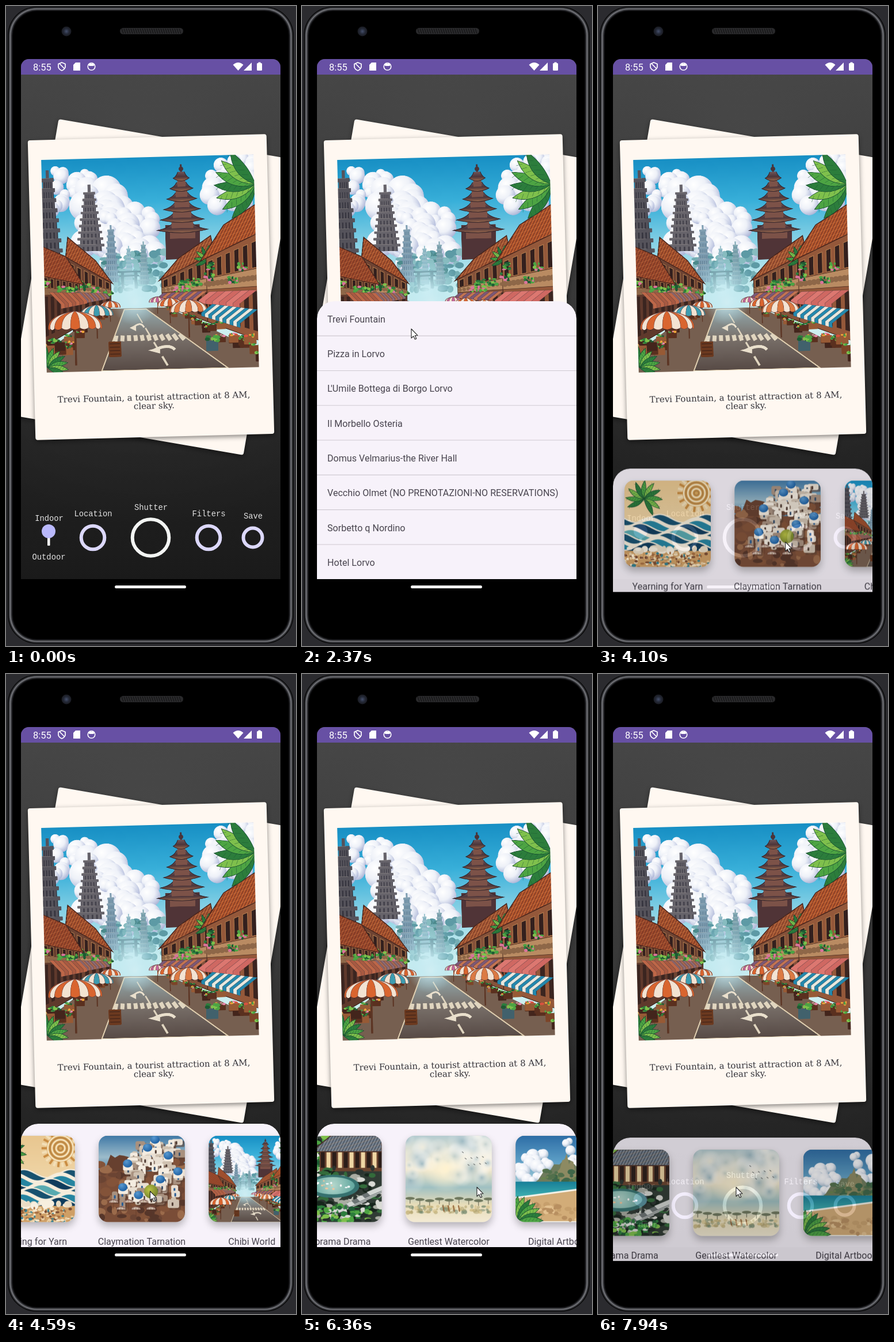
Animation of 504 by 1110 pixels, one loop 8000 ms. Source, as an HTML page with a canvas:

```html
<!DOCTYPE html>
<html lang="en">
<head>
<meta charset="utf-8">
<title>Travel postcard app</title>
<style>
html, body { margin: 0; width: 100%; height: 100%; overflow: hidden; background: #2a2a2e; }
canvas { display: block; }
</style>
</head>
<body>
<canvas id="stage" width="504" height="1110"></canvas>
<script>
const LOOP = 8000, LEFT = 26, WIDTH = 451, FLOOR = 994;
const SANS = 'Roboto, sans-serif';
const LEAVES = ['#1d5a33', '#2c7d3c', '#4da443', '#7fc04c'];
const FRUIT = ['#d9523f', '#eda63c', '#e786a8', '#4f9a45'];
const CRATES = ['#5a301f', '#7c4528', '#975a35', '#43251c'];
let g, seed = 1;

// ---------- helpers ----------
const rnd = () => (seed = seed * 16807 % 2147483647) / 2147483647;
const pick = list => list[Math.floor(rnd() * list.length)];
const times = (n, draw) => { for (let i = 0; i < n; i++) draw(i, i / n); };
const mix = (a, b, f) => a + (b - a) * f;
const clamp = v => Math.min(1, Math.max(0, v));
const ease = v => (v = clamp(v)) * v * (3 - 2 * v);

function layer(w, h, scale, paint) {
  const c = document.createElement('canvas');
  c.width = w * scale; c.height = h * scale;
  g = c.getContext('2d');
  g.scale(scale, scale);
  paint();
  return c;
}
function stops(grad, colors) {
  colors.forEach((c, i) => grad.addColorStop(i / (colors.length - 1), c));
  return grad;
}
const down = (y1, y2, ...colors) => stops(g.createLinearGradient(0, y1, 0, y2), colors);
const glow = (x, y, r, ...colors) => stops(g.createRadialGradient(x, y, 0, x, y, r), colors);

function box(color, x, y, w, h, r = 0) {
  g.fillStyle = color;
  g.beginPath(); g.roundRect(x, y, w, h, r); g.fill();
}
function disc(color, x, y, rx, ry = rx) {
  g.fillStyle = color;
  g.beginPath(); g.ellipse(x, y, rx, ry, 0, 0, 7); g.fill();
}
function ring(color, x, y, r, width) {
  g.strokeStyle = color; g.lineWidth = width;
  g.beginPath(); g.arc(x, y, r, 0, 7); g.stroke();
}
function poly(color, pts, ink, width = 1) {
  g.beginPath();
  for (let i = 0; i < pts.length; i += 2) g.lineTo(pts[i], pts[i + 1]);
  g.closePath();
  g.fillStyle = color; g.fill();
  if (ink) { g.strokeStyle = ink; g.lineWidth = width; g.stroke(); }
}
function line(color, width, x1, y1, x2, y2) {
  g.strokeStyle = color; g.lineWidth = width;
  g.beginPath(); g.moveTo(x1, y1); g.lineTo(x2, y2); g.stroke();
}
function text(str, x, y, font, color, align = 'left') {
  g.font = font; g.fillStyle = color; g.textAlign = align;
  g.fillText(str, x, y);
}
function scatter(n, x, y, w, h, size, colors) {
  times(n, () => disc(pick(colors), x + rnd() * w, y + rnd() * h, size * (.4 + rnd()), size * (.4 + rnd() * .6)));
}

// ---------- picture parts ----------
function cloud(x, y, w, h, n, shade = '#a9b3d6') {
  times(n, (i, f) => {
    const r = h * (.12 + rnd() * .12), px = x + rnd() * w, py = y + h * f;
    disc(glow(px - r * .3, py - r * .4, r * 1.5, '#fff', '#eef1f8', shade), px, py, r);
  });
}
function temple(x, top, bottom, w, stone, dark) {
  const n = 9, step = (bottom - top) / n;
  line(stone, w / 10, x, top - w / 4, x, top);
  times(n, (i, f) => {
    const half = w * mix(.2, .5, f), y = top + i * step;
    box(dark, x - half * .8, y, half * 1.6, step + 1);
    times(5, k => box(stone, x + half * (k * .32 - .76), y + 3, half * .2, step - 2));
    box(stone, x - half, y, half * 2, step * .4, 1);
    box('#e0d0c038', x - half, y, half * 1.4, 1);
  });
}
function pagoda(x, top) {
  line('#4a3338', 3, x, top, x, top + 24);
  disc('#4a3338', x, top + 8, 4);
  box('#503437', x - 30, top + 105, 60, 60);
  for (let i = 5; i >= 0; i--) {
    const half = 14 + i * 6, y = top + 24 + i * 18;
    box('#7c5248', x - half * .5, y, half, 15);
    g.beginPath(); g.moveTo(x - half * .4, y - 11);
    g.quadraticCurveTo(x - half * .6, y - 3, x - half, y);
    g.quadraticCurveTo(x, y + 10, x + half, y);
    g.quadraticCurveTo(x + half * .6, y - 3, x + half * .4, y - 11);
    g.fillStyle = down(y - 11, y + 6, '#6f5558', '#4c353a', '#a5704f'); g.fill();
    g.strokeStyle = '#33242a'; g.lineWidth = 1; g.stroke();
  }
}
function tiled(pts, color, shade) {
  poly(color, pts, '#45241c', 1.5);
  g.save(); g.clip();
  times(110, i => line(shade, 1, i * 5, 0, i * 5 - 190, 370));
  times(60, i => line('#ffb36a38', 1, 0, i * 7, 370, i * 7 - 120));
  g.restore();
}
function umbrella(x, y, r, color) {
  const n = 9, h = r * .62, edge = i => x - r * Math.cos(Math.PI * i / n);
  line('#5c3524', r / 14, x, y - h, x, y + r * 1.4);
  times(n, i => {
    const a = edge(i), b = edge(i + 1);
    g.beginPath(); g.moveTo(x, y - h);
    g.quadraticCurveTo(a, y - h * .8, a, y);
    g.quadraticCurveTo((a + b) / 2, y + h * .2, b, y);
    g.quadraticCurveTo(b, y - h * .8, x, y - h);
    g.fillStyle = i % 2 ? '#f3e3d2' : color; g.fill();
    g.strokeStyle = '#5b303080'; g.lineWidth = .7; g.stroke();
  });
}
function palm(x, y, len, from, to, n) {
  times(n, (i, f) => {
    g.save(); g.translate(x, y); g.rotate(mix(from, to, f));
    g.beginPath(); g.moveTo(0, 0);
    g.quadraticCurveTo(len * .5, -len * .34, len, 0);
    g.quadraticCurveTo(len * .5, len * .16, 0, 0);
    g.fillStyle = LEAVES[1 + i % 3]; g.fill();
    g.strokeStyle = '#174d30'; g.lineWidth = .8; g.stroke();
    times(7, (k, d) => line('#1d5a3390', .8, len * d, 0, len * (d + .1), -len * .12));
    g.restore();
  });
}
function ridge(color, x1, x2, base, height) {
  const pts = [x1, base];
  times(13, (i, f) => pts.push(mix(x1, x2, f), base - height * Math.sin(Math.PI * f) * (.5 + rnd() * .5)));
  poly(color, [...pts, x2, base]);
}

// ---------- street in one-point perspective ----------
const EYE = { x: 152, y: 238 }, WEST = -152, EAST = 218;
const place = (side, depth, height) => [EYE.x + side * depth, EYE.y - height * depth];
function slab(color, side, far, near, top, bottom, ink) {
  poly(color, [...place(side, far, top), ...place(side, near, top), ...place(side, near, bottom), ...place(side, far, bottom)], ink);
}
function awning(side, far, near, height, n, color, alt) {
  times(n, (i, f) => {
    const a = mix(far, near, f), b = mix(far, near, f + 1 / n), reach = side * .86;
    poly(i % 2 ? alt : color, [...place(side, a, height), ...place(side, b, height),
      ...place(reach, b, height - 23), ...place(reach, b, height - 31),
      ...place(reach, a, height - 31), ...place(reach, a, height - 23)], '#30303a50', .7);
  });
}
function house(side, far, near, tall, wall, roof, n = 6) {
  slab(wall, side, far, near, tall, -85, '#38211c');
  times(n, (i, f) => {
    const a = mix(far, near, f + .2 / n), b = mix(far, near, f + .75 / n);
    slab('#33201e', side, a, b, tall * .84, tall * .4, '#b17a4c');
    slab('#3b2520', side, a, b, 0, -70);
  });
  slab('#b98b62', side, far, near, tall * .38, tall * .08, '#5f3d2c');
  times(n * 2, (i, f) => disc('#8e6748', ...place(side, mix(far, near, f + .25 / n), tall * .23), near * 5));
  const peak = mix(far, near, .35);
  tiled([...place(side, far * .92, tall - 5), ...place(side, peak, tall + 52), ...place(side, near, tall + 46),
    ...place(side, near * 1.04, tall - 5)], roof, '#6f2f20');
  times(4, () => {
    const [x, y] = place(side, mix(far, near, rnd()), tall * (.3 + rnd() * .5));
    scatter(14, x - 8, y, 16, 12, 3, [...LEAVES, '#d9749b']);
  });
}

function village() {
  seed = 77;
  box(down(0, 230, '#178fc4', '#38afd9', '#8ed4e6', '#cdeff0'), 0, 0, 370, 370);
  cloud(15, 20, 70, 70, 22);
  cloud(70, 50, 70, 110, 34);
  cloud(105, 95, 95, 90, 34);
  cloud(290, 5, 80, 85, 28);
  scatter(90, 95, 165, 120, 65, 7, ['#5d9aa5', '#74aeb4', '#4c8a8c', '#87bcc0']);
  temple(118, 124, 215, 30, '#7f9eb2', '#617f94');
  temple(148, 158, 220, 18, '#95bfcb', '#7aa5b5');
  temple(174, 152, 220, 22, '#83a9b5', '#668b99');
  times(2, i => {
    box('#56808b', 128 + i * 3, 197 + i * 7, 40 - i * 6, 3);
    box('#56808b', 134 + i * 23, 198, 5, 30);
  });
  disc(glow(150, 232, 60, '#cfeff4f0', '#a8dfeb00'), 150, 232, 60);
  temple(10, 32, 190, 54, '#55535b', '#34333d');
  temple(82, 58, 160, 52, '#67646b', '#42404a');
  pagoda(243, 14);
  house(WEST, .24, .72, 96, '#6e4433', '#a9552f');
  house(WEST, .6, 1.02, 40, '#5f392c', '#9c4a2c');
  house(EAST, .24, .64, 108, '#85523a', '#a85c37');
  palm(286, 180, 24, -3.6, 1.2, 9);
  house(EAST, .6, 1.02, 104, '#94583a', '#b4582e');
  palm(372, 52, 72, 2.2, 4.4, 7);
  awning(WEST, .3, .62, 10, 9, '#8d6a74', '#a76750');
  awning(WEST, .6, .95, 8, 7, '#bd6748', '#a85a42');
  awning(EAST, .25, .6, 4, 10, '#7c5877', '#c47452');
  awning(EAST, .62, 1, 2, 6, '#dc7770', '#cf6862');

  const road = [138, 264, 176, 264, 316, 370, 96, 370];
  poly('#765f50', [100, 262, 215, 262, 420, 370, -50, 370]);
  poly(down(262, 370, '#93aaae', '#786f69', '#574a45'), road, '#e0cfb0', 2);
  g.save(); g.clip();
  times(12, i => line('#e0d5bf', 7, 112 + i * 11, 309, 109 + i * 12, 319));
  times(4, i => line('#e0d5bf', 2 + i * .6, 160 + i * 14, 272 + i * 25, 169 + i * 14, 288 + i * 25));
  times(2, i => {
    const x = 152 + i * 36, y = 296 + i * 40, w = 14 + i * 12;
    g.beginPath(); g.moveTo(x, y);
    g.quadraticCurveTo(x + w, y - 12, x + w * 1.4, y);
    g.strokeStyle = '#e9dfcc'; g.lineWidth = 3 + i * 2; g.stroke();
    poly('#e9dfcc', [x - w * .4, y, x + w * .4, y - 5, x + w * .4, y + 6]);
  });
  g.restore();
  disc(glow(156, 252, 40, '#d3eff4c0', '#b5e3ee00'), 156, 252, 40);

  times(44, (i, f) => {
    const depth = .25 + f * .75, side = i % 2 ? EAST : WEST, size = 20 * depth;
    const [x, y] = place(side * (.9 + rnd() * .2), depth, -80 - rnd() * 30);
    box(pick(CRATES), x - size / 2, y, size * 1.2, size * .8, 1);
    scatter(6, x - size / 2, y - size * .2, size, size * .25, size * .16, i % 3 ? LEAVES : FRUIT);
  });
  const shades = ['#db7a43', '#3d9cb0', '#c5669b', '#d9652f'];
  for (let k = 2; k >= 0; k--) {
    const west = .66 * .62 ** k, east = .45 * .67 ** k;
    umbrella(...place(WEST, west, -84), west * 71, shades[(3 + k * 2) % 4]);
    umbrella(...place(EAST, east, -70), east * 73, shades[(4 - k) % 4]);
  }
  awning(EAST, .64, 1, -32, 11, '#2388ad', '#e9e8de');
  palm(2, 362, 36, -1.6, .8, 7);
  box('#41616c', 279, 322, 21, 18, 2);
  scatter(16, 278, 314, 22, 8, 4, LEAVES);
  box('#6b391f', 109, 319, 22, 27, 2);
  times(4, i => line('#42241a', 1.2, 111, 323 + i * 6, 129, 323 + i * 6));
}

// ---------- style thumbnails, 150 x 150 ----------
function yarn() {
  seed = 5;
  box(down(0, 80, '#e8c68f', '#f0d6a8'), 0, 0, 150, 150);
  times(26, (i, f) => {
    const a = f * Math.PI * 2;
    line(i % 2 ? '#c98c42' : '#f3dfb8', 4, 125, 22, 125 + 33 * Math.cos(a), 22 + 33 * Math.sin(a));
  });
  disc('#d9a75a', 125, 22, 24);
  times(6, i => ring(i % 2 ? '#f6e6c6' : '#b98546', 125, 22, 4 + i * 3.6, 2.4));
  palm(34, 32, 32, -3.6, 1.6, 10);
  times(7, k => {
    for (let x = 0; x <= 150; x += 2) {
      const y = 66 + k * 8 + Math.sin(x / 13 + k * 1.3) * 7;
      box(['#17516f', '#2584a0', '#0f3c5c', '#58aab0'][k % 4], x, y, 3, 150 - y);
      disc('#f6eddb', x, y, 2, k % 2 ? 3.5 : 1);
    }
  });
  box('#cf9f65', 0, 122, 150, 28);
  scatter(20, 0, 116, 150, 8, 7, ['#f7efdf', '#e9dcc5']);
  scatter(150, 0, 126, 150, 24, 3, ['#e9cda0', '#a86f42', '#f7e6c8', '#327f91', '#7b4c33']);
}
function clay() {
  seed = 11;
  box(down(0, 75, '#3f78a5', '#9cbccb', '#245f8c'), 0, 0, 150, 150);
  ridge('#67402f', -10, 90, 70, 48);
  box('#7a4d37', 0, 62, 150, 88);
  scatter(120, 0, 40, 150, 110, 8, ['#835339', '#56362a', '#9b6b4b', '#6b4433']);
  times(85, (i, f) => {
    const y = mix(6, 112, f), x = mix(62 - f * 50, 136, rnd()), w = 9 + rnd() * 12, h = 9 + rnd() * 11;
    box('#5d4032a0', x + 3, y + 3, w, h, 2);
    box(pick(['#e9dfd2', '#cfc1b0', '#f4ece0', '#a8917f']), x, y, w, h, 3);
    box(pick(['#285c94', '#4f3b32', '#39506b']), x + w * .35, y + h * .35, 3, 6, 1);
    if (i % 11 === 5) {
      box('#f4ece0', x - 2, y - 3, 17, 10, 2);
      disc(glow(x + 4, y - 8, 10, '#5a9ad0', '#1f62a5'), x + 6, y - 5, 8, 7);
    }
  });
  disc(glow(88, 94, 15, '#bcc444', '#77842d'), 91, 97, 12);
  times(6, i => umbrella(26 + i * 13, 116 + i % 2 * 12, 8, '#cdbda3'));
}
function diorama() {
  seed = 23;
  box('#303b34', 0, 0, 150, 150);
  scatter(90, 0, 0, 60, 70, 7, [...LEAVES, '#16281d', '#dfe4dc']);
  box('#6b442f', 42, 26, 108, 36);
  times(11, i => box(i % 2 ? '#efd6a4' : '#2b1d19', 44 + i * 10, 29, 7, 27));
  tiled([28, 28, 62, 0, 150, 0, 150, 28], '#76818e', '#353d48');
  times(9, i => line('#c5ccd2', 3, 0, i * 5, 45 - i * 4, 0));
  scatter(150, 0, 56, 150, 90, 7, ['#a9aca2', '#2b3430', '#d9dad4', '#336b3b', '#17251c']);
  disc('#36716f', 65, 88, 46, 20);
  disc(glow(65, 86, 40, '#b5d8cd', '#5ba39b'), 65, 87, 38, 15);
  scatter(14, 35, 78, 60, 18, 2, ['#f0c69f', '#fff']);
  times(7, i => poly(i % 2 ? '#6c7474' : '#d3d6d3', [70 + i * 9, 128 - i * 5, 118 + i * 9, 108 - i * 5, 124 + i * 9, 114 - i * 5, 76 + i * 9, 134 - i * 5]));
  disc(glow(25, 58, 16, '#ffffffe0', '#ffffff00'), 25, 58, 16);
  scatter(90, 0, 122, 130, 28, 5, [...LEAVES, '#d9dbd4', '#222e27']);
}
function watercolor() {
  seed = 31;
  box(down(0, 150, '#b3cbd0', '#e6e4d2', '#f2e8cd', '#9fc0c2', '#e8ddb9', '#f3ead4'), 0, 0, 150, 150);
  times(40, () => {
    const x = rnd() * 150, y = rnd() * 80, r = 8 + rnd() * 20;
    disc(glow(x, y, r, pick(['#86a9b8b0', '#f8f1dfd0', '#b9c9cac0']), '#ffffff00'), x, y, r);
  });
  disc(glow(70, 58, 40, '#fff2cf', '#fff4d600'), 70, 58, 40);
  times(9, i => {
    const x = 8 + i * 17, y = 109 + i * 7 % 5;
    line('#5d5b48', 1, x, y, x, y + 9);
    disc('#6f785e', x, y, 8, 2.5);
    line('#4c5152', .8, 98 + i * 5, 28 + i * 11 % 23, 101 + i * 5, 30 + i * 11 % 23);
  });
  scatter(70, 0, 122, 150, 12, 4, ['#a99a6180', '#cdb77a80', '#6d846980']);
  times(4, i => line('#96663b', 2, 65 + i * 9, 121, 67 + i * 9, 132));
}
function artbook() {
  seed = 43;
  box(down(0, 85, '#2d6da6', '#5a9cc4', '#a5ced8'), 0, 0, 150, 150);
  cloud(5, 30, 60, 50, 22, '#9db5ca');
  cloud(85, 10, 65, 50, 16, '#9db5ca');
  ridge('#6e7b5c', 30, 150, 84, 52);
  ridge('#8d8a62', 62, 112, 84, 62);
  scatter(50, 45, 60, 90, 24, 5, ['#3f6648', '#69824f', '#52704c']);
  box(down(80, 112, '#187f98', '#46bab6'), 0, 80, 150, 35);
  poly('#d2ac78', [0, 108, 150, 88, 150, 150, 0, 150], '#f7f4ea', 3);
  scatter(60, 0, 118, 150, 32, 5, ['#b88f60', '#e3c190', '#c69f6c']);
  palm(3, 150, 45, -1.8, .2, 8);
}

// ---------- phone and home screen ----------
function card(angle) {
  g.translate(252, 487.5); g.rotate(angle * Math.PI / 180);
  g.shadowColor = '#0007'; g.shadowBlur = 8; g.shadowOffsetY = 3;
  box('#fff8f1', -207.5, -260, 415, 520, 4);
  g.shadowColor = 'transparent';
}
function phone() {
  box('#2b2b2f', 0, 0, 504, 1110);
  ['#0b0b0c', '#3b3c40', '#75767b', '#3a3b3f', '#0e0e10', '#000'].forEach((shade, i) =>
    box(shade, 3 + i * 1.8, 1 + i * 1.6, 497 - i * 3.6, 1105 - i * 3.2, 50 - i * 1.6));
  disc(glow(105, 44, 9, '#46506c', '#252a38', '#17181d'), 105, 44, 8.5);
  box('#29292b', 198, 38, 110, 11, 5.5);
  times(26, i => line('#101011', 1, 201 + i * 4, 39, 204 + i * 4, 48));
  box('#f3f3f3', 189, 1005, 124, 5, 2.5);

  g.beginPath(); g.roundRect(LEFT, 92, WIDTH, FLOOR - 92, [14, 14, 0, 0]); g.clip();
  box(down(119, FLOOR, '#464646', '#363636', '#232323'), LEFT, 92, WIDTH, 902);
  box(glow(252, 300, 600, '#ffffff0c', '#00000000', '#00000040'), LEFT, 92, WIDTH, 902);
  statusBar();
  g.save(); card(9.75); g.restore();
  g.save();
  card(-1.5);
  g.drawImage(villageArt, -185, -225.5, 369, 369);
  ['Trevi Fountain, a tourist attraction at 8 AM,', 'clear sky.'].forEach((s, i) =>
    text(s, 0, 196 + i * 15, '15px "DejaVu Serif", serif', '#33333a', 'center'));
  g.restore();
  controls();
}
function statusBar() {
  box('#6750a4', LEFT, 92, WIDTH, 27);
  text('8:55', 47, 111.5, '16.5px ' + SANS, '#fff');
  g.strokeStyle = g.fillStyle = '#fff'; g.lineWidth = 1.7;
  g.stroke(new Path2D('M97 98l6 2.5V106q-1 4-6 6q-5-2-6-6v-5.500zM93 100l9 9'));
  g.fill(new Path2D('M121 98h8v14h-12v-10z'));
  g.fill(new Path2D('M403.500 112l-9-10q9-8 18 0zM427 98v14h-14z'));
  ring('#fff', 148.5, 105, 6.3, 1.6);
  box('#fff', 143.5, 100, 10, 4, 2);
  box('#fff', 436, 99, 9, 13, 1.5);
  box('#fff', 438.5, 97.5, 4, 3);
}
function controls() {
  const label = (s, x, y) => text(s, x, y, '13.8px "Liberation Mono", monospace', '#e2e2e2', 'center');
  const button = (s, x, r, color = '#dcd8fc') => {
    ring(color, x, 922, r, 6);
    label(s, x + .5, 905.5 - r);
  };
  label('Indoor', 75, 893);
  label('Outdoor', 74.5, 960);
  box('#fff', 72, 912, 4.5, 24, 1);
  disc('#b9b8fb', 74, 911, 12);
  button('Location', 151, 20.3);
  button('Shutter', 251.5, 31.8, '#f3f5f3');
  button('Filters', 352, 20.3);
  button('Save', 429, 16.5);
}

// ---------- bottom sheets ----------
const PLACES = ['Trevi Fountain', 'Pizza in Lorvo', "L'Umile Bottega di Borgo Lorvo", 'Il Morbello Osteria',
  'Domus Velmarius-the River Hall', 'Vecchio Olmet (NO PRENOTAZIONI-NO RESERVATIONS)', 'Sorbetto q Nordino', 'Hotel Lorvo'];
const SHEET_FONT = '16.1px ' + SANS, SHEET_INK = '#49454f';

function panel(top) {
  g.clearRect(0, 0, 504, 1110);
  g.beginPath(); g.roundRect(LEFT, top, WIDTH, FLOOR - top, [30, 30, 0, 0]); g.clip();
  g.fillStyle = '#f7f2fa'; g.fill();
}
function placesSheet() {
  panel(512);
  PLACES.forEach((name, i) => {
    const y = 512 + i * 60.3;
    text(name, 44, y + 36.8, SHEET_FONT, SHEET_INK);
    if (i < 7) box('#cfcad2', LEFT, y + 59.6, WIDTH, 1.1);
  });
}
function stylesSheet(t) {
  panel(780);
  styles.forEach(({ name, art }, i) => {
    const x = 46 + i * 191.3 - scrollAt(t);
    g.shadowColor = '#0004'; g.shadowBlur = 13; g.shadowOffsetY = 7;
    box('#ddd', x, 800.5, 150, 150, 16);
    g.shadowColor = 'transparent';
    g.save();
    g.beginPath(); g.roundRect(x, 800.5, 150, 150, 16); g.clip();
    g.imageSmoothingQuality = 'high';
    g.drawImage(art, x, 800.5, 150, 150);
    g.restore();
    text(name, x + 75, 989.5, SHEET_FONT, SHEET_INK, 'center');
  });
}

const villageArt = layer(370, 370, 2, village);
const thumb = paint => layer(150, 150, 2, paint);
const styles = [
  { name: 'Yearning for Yarn', art: thumb(yarn) },
  { name: 'Claymation Tarnation', art: thumb(clay) },
  { name: 'Chibi World', art: villageArt },
  { name: 'Diorama Drama', art: thumb(diorama) },
  { name: 'Gentlest Watercolor', art: thumb(watercolor) },
  { name: 'Digital Artbook', art: thumb(artbook) }
];
const home = layer(504, 1110, 1, phone);
const sheetLayer = layer(504, 1110, 1, () => {});
const sheetContext = sheetLayer.getContext('2d');
const stageContext = document.getElementById('stage').getContext('2d');

// ---------- motion ----------
const SWIPES = [
  { start: 4380, length: 640, distance: 300 },
  { start: 5170, length: 650, distance: 270 },
  { start: 6070, length: 505, distance: 100 },
  { start: 6780, length: 550, distance: -24 }
];
const scrollAt = t => SWIPES.reduce((sum, s) => sum + s.distance * ease((t - s.start) / s.length), 0);

// each glide leaves at one time and reaches x, y at another
const GLIDES = [
  { leave: 130, reach: 760, x: 151, y: 922 },
  { leave: 1040, reach: 1320, x: 221, y: 805 },
  { leave: 1810, reach: 2200, x: 190, y: 560 },
  { leave: 2450, reach: 2930, x: 345, y: 938 },
  { leave: 3900, reach: 4590, x: 251, y: 897 },
  { leave: 4590, reach: 5480, x: 189, y: 902 },
  { leave: 5480, reach: 6360, x: 304, y: 890 },
  { leave: 6780, reach: 7330, x: 366, y: 890 },
  { leave: 7530, reach: 7740, x: 240, y: 890 }
];
function pointer(t) {
  let x = 390, y = 1061;
  for (const p of GLIDES) {
    const f = ease((t - p.leave) / (p.reach - p.leave));
    x = mix(x, p.x, f); y = mix(y, p.y, f);
  }
  // the hand swings back and forth once per swipe
  if (t > 4590 && t < 6360) x -= 75 * Math.sin((t - 4590) / 885 * Math.PI * 2);
  g.save(); g.translate(x, y);
  g.lineJoin = 'round';
  poly('#fff', [0, 0, 0, 16, 3.7, 12.6, 6.3, 18, 8.8, 17, 6.3, 11.5, 11, 11.3], '#222', 1.1);
  g.restore();
}
function showSheet(t, open, close, paint) {
  if (t < open) return;
  const opening = (1 - clamp((t - open) / 300)) ** 2;
  const closing = t < close ? 0 : (Math.floor((t - close) / 70) + 1) * .42;
  const away = clamp(opening + closing);
  if (away === 1) return;
  g = sheetContext;
  g.save(); paint(t); g.restore();
  g = stageContext;
  g.globalAlpha = 1 - away * away;
  g.drawImage(sheetLayer, 0, 28 * (1 - (1 - away) ** 3.6));
  g.globalAlpha = 1;
}
function ripple(t, start, x) {
  if (t > start && t < start + 260) disc('#ffffff24', x, 921, 28);
}
function frame(now) {
  const t = now % LOOP;
  g = stageContext;
  g.drawImage(home, 0, 0);
  ripple(t, 760, 151);
  ripple(t, 3420, 352);
  showSheet(t, 1000, 2440, placesSheet);
  showSheet(t, 3980, 7940, stylesSheet);
  if (t >= 130) pointer(t);
  requestAnimationFrame(frame);
}
requestAnimationFrame(frame);
</script>
</body>
</html>
```
